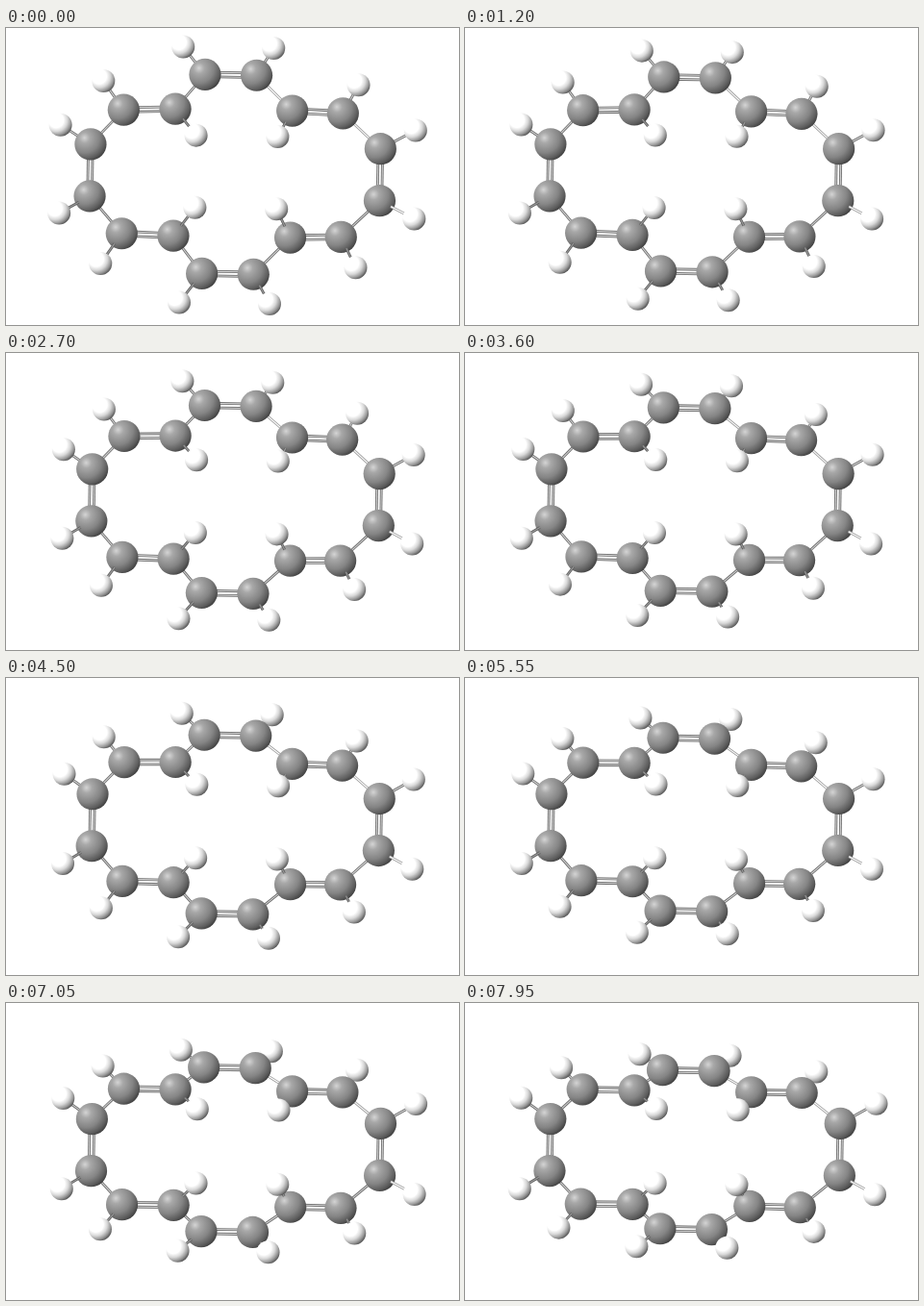
An HTML page with a canvas that plays this animation: 471x309 px, repeating every 8 s.

```html
<!DOCTYPE html>
<html lang="en">
<head>
<meta charset="utf-8">
<title>Ring molecule</title>
<style>
html, body { margin: 0; height: 100%; overflow: hidden; background: #fff; }
canvas { display: block; }
</style>
</head>
<body>
<canvas id="stage" width="471" height="309"></canvas>
<script>
const ctx = document.getElementById('stage').getContext('2d');
const LOOP = 8000, STEP = 150, LAST = 7950;
const CX = 235.5, CY = 151.2, TILT = .016;

// One quarter of the ring; the other three are its mirror images.
// w, h: distance from the centre; z: depth; squash: loss of h over the loop.
const quarter = [
  { c: { w: 26.8, h: 103.5, z: -3.4, squash: 21 }, h: { w: 47, h: 133, z: -6.4, squash: 33 } },
  { c: { w: 60.8, h: 66, z: .3, squash: 6.7 }, h: { w: 42.4, h: 37.6, z: 3.9, squash: -1.2 } },
  { c: { w: 114, h: 64.3, z: -.2, squash: 4.7 }, h: { w: 132.6, h: 95, z: -3.1, squash: 11.8 } },
  { c: { w: 150.7, h: 27, z: 2.7, squash: 0 }, h: { w: 184.6, h: 45.9, z: 5, squash: -1.3 } }
];

const carbonTones = [[0, '#d4d4d4'], [.22, '#a8a8a8'], [.6, '#858585'], [.85, '#5e5e5e'], [1, '#3e3e3e']];
const hydrogenTones = [[0, '#fff'], [.42, '#fff'], [.63, '#d8d8d8'], [.83, '#989898'], [1, '#505050']];

function place(p, side, down, u) {
  const bow = 4 * u * (1 - u);
  const dx = side * (p.w - 3 * (p.w / 185) ** 3 * bow);
  const dy = down * (p.h - p.squash * (u - .06 * bow));
  const depth = p.z * (1 + .33 * u);
  return {
    x: CX + depth + dx - TILT * dy,
    y: CY - depth * .33 + dy + TILT * dx
  };
}

// Walks clockwise round the ring from the top.
function buildRing(u) {
  return Array.from({ length: 16 }, (_, i) => {
    const q = Math.floor(i / 4);
    const kind = q % 2 ? 3 - i % 4 : i % 4;
    const side = q < 2 ? 1 : -1;
    const down = q === 1 || q === 2 ? 1 : -1;
    return {
      c: place(quarter[kind].c, side, down, u),
      h: place(quarter[kind].h, side, down, u),
      front: down > 0 || kind === 1
    };
  });
}

// Light falls from the upper left.
function ball({ x, y }, r, tones) {
  const lx = x - r * .38, ly = y - r * .4;
  const g = ctx.createRadialGradient(lx, ly, 0, lx, ly, r * 1.55);
  for (const [at, tone] of tones) g.addColorStop(at, tone);
  ctx.fillStyle = g;
  ctx.beginPath();
  ctx.arc(x, y, r, 0, 2 * Math.PI);
  ctx.fill();
}

function rod(a, b, { shift = 0, start = 0, edge = '#6c6c6c', core = '#d0d0d0' } = {}) {
  const len = Math.hypot(b.x - a.x, b.y - a.y);
  const dx = (b.x - a.x) / len, dy = (b.y - a.y) / len;
  const ox = -dy * shift, oy = dx * shift;
  const slope = dy / dx;
  if (a.x > CX && slope > .3 && slope < 1.1) [edge, core] = ['#a0a0a0', '#fff'];
  for (const [width, tone] of [[2.8, edge], [1.1, core]]) {
    ctx.lineWidth = width;
    ctx.strokeStyle = tone;
    ctx.beginPath();
    ctx.moveTo(a.x + dx * start + ox, a.y + dy * start + oy);
    ctx.lineTo(b.x + ox, b.y + oy);
    ctx.stroke();
  }
}

function drawHydrogen({ c, h }, style) {
  rod(c, h, style);
  ball(h, 12, hydrogenTones);
}

function draw(now) {
  const u = Math.floor(now % LOOP / STEP) * STEP / LAST;
  const ring = buildRing(u);

  ctx.fillStyle = '#fff';
  ctx.fillRect(0, 0, 471, 309);

  ring.forEach((atom, i) => {
    const next = ring[(i + 1) % ring.length];
    const shifts = i % 2 ? [-2.3, 2.3] : [0];
    for (const shift of shifts) rod(atom.c, next.c, { shift });
    if (!atom.front) drawHydrogen(atom);
  });
  for (const { c } of ring) ball(c, 16.6, carbonTones);
  for (const atom of ring) {
    if (atom.front) drawHydrogen(atom, { start: 13, edge: '#606060', core: '#999' });
  }
  requestAnimationFrame(draw);
}
requestAnimationFrame(draw);
</script>
</body>
</html>
```
